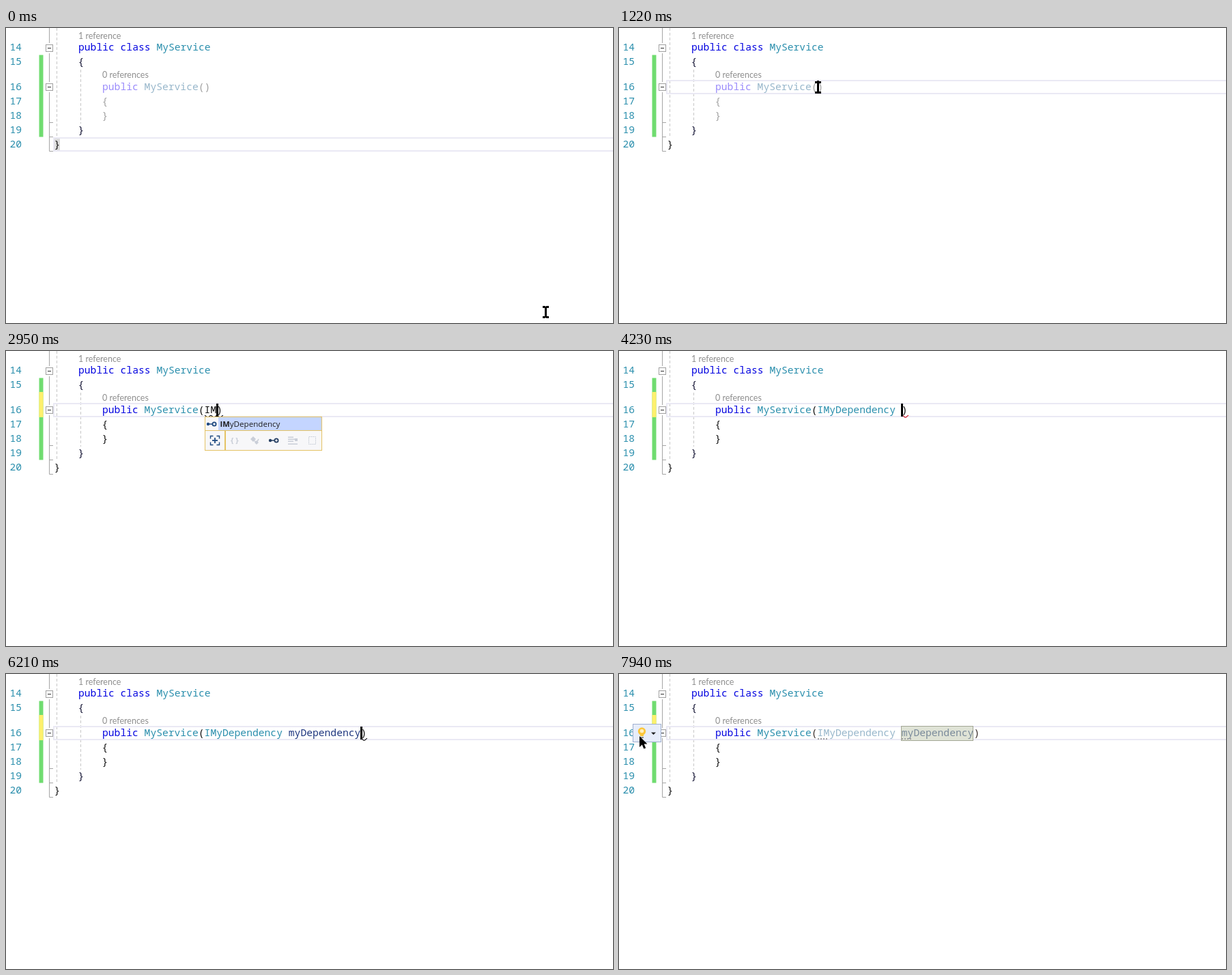
An HTML page with a canvas that plays this animation: 889x432 px, repeating every 8000 ms.

```html
<!DOCTYPE html>
<html lang="en">
<head>
<meta charset="utf-8">
<title>Constructor injection in a code editor</title>
<style>
html, body { margin: 0; width: 100%; height: 100%; overflow: hidden; background: #fff; }
canvas { display: block; width: 889px; height: 432px; }
</style>
</head>
<body>
<canvas id="stage" width="889" height="432"></canvas>
<script>
const ctx = document.getElementById('stage').getContext('2d', { alpha: false });
const LOOP = 8000, CHAR = 8.8;
const CODE = `${CHAR / 0.6}px "Noto Sans Mono", "DejaVu Sans Mono", monospace`;
const UI = '11.6px "Open Sans", "Noto Sans", sans-serif';
const UI_BOLD = 'bold 11.2px "Open Sans", "Noto Sans", sans-serif';
const LENS = '12.5px Lato, "Open Sans", sans-serif';
const BLUE = '#0404e0', TEAL = '#2b8fad', INK = '#101010', NAVY = '#1f377f';
const PALE_BLUE = '#9a8bfb', PALE_TEAL = '#98b7cb', PALE = '#a0a0a0';
const GOLD = '#e5c365', DIM = '#c9ced8', ICON = '#1f4a80', LINE = '#a5a5a5';
const ROWS = { 14: 33, 15: 54, 16: 91, 17: 112, 18: 133, 19: 154, 20: 175 };

const col = n => 141 + n * CHAR;
const within = (t, a, b) => t >= a && t < b;

function text(s, x, y, color, font = CODE) {
  ctx.font = font;
  ctx.fillStyle = color;
  ctx.fillText(s, x, y);
}
function fill(x, y, w, h, color) {
  ctx.fillStyle = color;
  ctx.fillRect(x, y, w, h);
}
function frame(x, y, w, h, color, width = 1) {
  ctx.strokeStyle = color;
  ctx.lineWidth = width;
  ctx.strokeRect(x, y, w, h);
}
function path(points, color, width = 1, dash = []) {
  ctx.strokeStyle = color;
  ctx.lineWidth = width;
  ctx.setLineDash(dash);
  ctx.beginPath();
  points.forEach(([x, y]) => ctx.lineTo(x, y));
  ctx.stroke();
  ctx.setLineDash([]);
}
function shape(points, color) {
  ctx.fillStyle = color;
  ctx.beginPath();
  points.forEach(([x, y]) => ctx.lineTo(x, y));
  ctx.fill();
}
function disc(x, y, r, color) {
  ctx.fillStyle = color;
  ctx.beginPath();
  ctx.arc(x, y, r, 0, Math.PI * 2);
  ctx.fill();
}
function squiggle(x, end, color) {
  const pts = [];
  for (let i = 0; x + i <= end; i++) pts.push([x + i, 95.8 - 1.5 * Math.cos(i * Math.PI / 4.5)]);
  path(pts, color, 1.1);
}
function dots(x) {
  for (let i = 0; i < 4; i++) fill(x + i * 4, 94, 2, 2, '#a0a0a0');
}

// Position along [time, x, y] stops.
function along(stops, t) {
  let i = 1;
  while (i < stops.length - 1 && t > stops[i][0]) i++;
  const [a, ax, ay] = stops[i - 1], [b, bx, by] = stops[i];
  const k = Math.min(1, Math.max(0, (t - a) / (b - a)));
  return [ax + (bx - ax) * k, ay + (by - ay) * k];
}
const ARRIVE = [[70, 790, 416], [200, 700, 373], [340, 567, 309], [520, 348, 150],
  [620, 315, 115], [760, 286, 89], [890, 286, 89], [1100, 291, 87]];
const LEAVE = [[6750, 797, 168], [6950, 524, 171], [7150, 275, 160], [7350, 65, 108],
  [7530, 32, 94], [7700, 30, 93], [7940, 30, 91]];

function gutter(t) {
  fill(48.5, 39.5, 6, 120, '#70dc70');
  if (t >= 2210) fill(48.5, 60, 6, 37, '#fff06c');

  path([[63.5, 0], [63.5, 180.5], [69, 180.5]], LINE);
  path([[63.5, 138.5], [69, 138.5]], LINE);
  path([[63.5, 159.5], [69, 159.5]], LINE);
  for (const y of [29, 86]) {
    fill(57, y - 7, 13, 15, '#fff');
    frame(58.5, y - 4.5, 10, 10, '#a0a0a0');
    fill(61, y, 5, 1, '#303030');
  }
  path([[74.5, 0], [74.5, 160]], '#c6c6c6', 1, [4, 3]);
  path([[109.5, 61], [109.5, 140]], '#c6c6c6', 1, [4, 3]);
  for (const n in ROWS) text(n, 5.5, ROWS[n], TEAL);
}

function caretColumn(t) {
  if (t < 2210) return 17;
  if (t < 2670) return 18;
  if (t < 3570) return 19;
  if (t < 4230) return 30;
  return t < 5940 ? 31 : 43;
}
function caretOn(t) {
  return [[1220, 1750], [2210, 3230], [3570, 4030], [4230, 4760], [5330, 5870],
    [5940, 6480], [7010, 7530]].some(([a, b]) => within(t, a, b));
}

function constructorLine(t) {
  const pale = t < 2950, final = t >= 6480;
  const punct = pale ? PALE : INK;
  if (final) {
    fill(413, 76, 106, 22, '#dfe3d6');
    frame(413.5, 76.5, 105, 21, '#a3a795');
  }
  text('public', col(0), 91, pale ? PALE_BLUE : BLUE);
  text('MyService', col(7), 91, pale ? PALE_TEAL : TEAL);
  text('(', col(16), 91, final ? '#3c302c' : punct);

  let end = 17;
  if (t >= 2210) {
    const type = t < 2670 ? 'I' : t < 3570 ? 'IM' : 'IMyDependency';
    const color = pale ? PALE : final ? PALE_TEAL : t < 3830 ? INK : TEAL;
    text(type, col(17), 91, color);
    end += type.length;
  }
  if (t >= 4230) end = 31;
  if (t >= 5940) {
    text('myDependency', col(31), 91, final ? '#7b8b9b' : NAVY);
    end = 43;
  }
  text(')', col(end), 91, final ? '#3c302c' : punct);
  text('{', 140.5, ROWS[17], punct);
  text('}', 140.5, ROWS[18], punct);

  if (within(t, 2950, 3570)) squiggle(291, 318, INK);
  if (within(t, 4230, 5940)) squiggle(415, 424, '#d01020');
  if (within(t, 5940, 6480)) squiggle(520, 529, INK);
  if (final) {
    dots(291);
    dots(414);
  }
  if (caretOn(t)) fill(Math.round(col(caretColumn(t)) - 0.4), 77, 3, 19, '#000');
}

function code(t) {
  if (t < 1220) {
    fill(70, 161, 9, 18, '#dcdcdc');
    frame(70, 161, 830, 19, '#eae9f4', 2);
  } else {
    frame(70, 77, 830, 19, '#eae9f4', 2);
  }
  text('1 reference', 106, 16, '#8e8e8e', LENS);
  text('public class', 106, 33, BLUE);
  text('MyService', 106 + 13 * CHAR, 33, TEAL);
  text('{', 105.5, ROWS[15], '#101030');
  text('0 references', 141, 73, '#8e8e8e', LENS);
  text('}', 105.5, ROWS[19], '#101030');
  text('}', 70.5, ROWS[20], INK);
  constructorLine(t);
}

function linkIcon(x, y, color) {
  disc(x - 5, y, 2.2, color);
  path([[x - 4, y], [x + 2, y]], color, 1.5);
  ctx.beginPath();
  ctx.arc(x + 4, y, 2.6, 0, Math.PI * 2);
  ctx.lineWidth = 1.8;
  ctx.stroke();
}
function toolbar(y) {
  path([[291, y + 0.5], [463, y + 0.5]], GOLD);
  path([[321, y], [321, y + 29]], GOLD, 2);
  const m = y + 15;
  for (const sx of [-1, 1]) for (const sy of [-1, 1]) {
    const x = 306 + sx * 6.5, v = m + sy * 6.5;
    path([[x - sx * 4, v], [x, v], [x, v - sy * 4]], ICON, 1.4);
  }
  path([[302, m], [310, m]], ICON, 1.8);
  path([[306, m - 4], [306, m + 4]], ICON, 1.8);
  text('{ }', 329, m + 4, DIM, UI_BOLD);
  shape([[358, m - 2], [362, m - 6], [366, m - 2], [362, m + 2]], DIM);
  path([[363, m], [367, m + 3], [370, m - 2]], DIM, 1.5);
  shape([[364, m + 3], [367, m], [370, m + 3], [367, m + 6]], DIM);
  linkIcon(392, m, '#263f63');
  [[-5, 8], [-2, 14], [1, 8], [5, 14]].forEach(([d, w]) => fill(413, m + d - 0.5, w, 1.5, DIM));
  fill(423, m - 3, 4, 4, DIM);
  ctx.setLineDash([2, 1]);
  frame(443.5, m - 5.5, 10, 11, DIM);
  ctx.setLineDash([]);
}
function panel(x, y, w, h) {
  fill(x, y, w, h, '#f7f7f9');
  frame(x + 0.5, y + 0.5, w - 1, h - 1, GOLD);
}

function typeList(t) {
  const narrow = t >= 2740;
  const items = narrow ? ['IMyDependency'] : ['IAsyncDisposable', 'IAsyncEnumerable<>',
    'IAsyncEnumerator<>', 'IAsyncResult', 'ICloneable', 'IComparable', 'IComparable<>',
    'IConvertible', 'IMyDependency'];
  const h = items.length * 19;
  panel(291, 96, 172, h + 31);
  fill(311, 97, 151, 19, '#c4d5ff');
  items.forEach((name, i) => {
    const n = narrow ? 2 : 1, y = 111 + i * 19;
    linkIcon(301, y - 4, ICON);
    text(name.slice(0, n), 313.5, y, '#1e1e1e', UI_BOLD);
    const w = ctx.measureText(name.slice(0, n)).width;
    text(name.slice(n), 313.5 + w, y, '#1e1e1e', UI);
  });
  toolbar(96 + h + 1);
  if (t >= 3300) {
    fill(465, 96, 215, 24, '#f7f7f9');
    frame(465.5, 96.5, 214, 23, '#cccedb');
    linkIcon(477, 108, ICON);
    text('interface', 488, 112, BLUE, UI);
    text('MyProject.', 541, 112, '#1e1e1e', UI);
    text('IMyDependency', 597, 112, TEAL, UI);
  }
}

function nameList(t) {
  const chosen = t >= 5120, w = chosen ? 124 : 109;
  panel(414, 96, w, 80);
  if (chosen) fill(435, 117, w - 22, 19, '#c4d5ff');
  else frame(435.5, 117.5, w - 23, 18, '#9db4ea');
  ['dependency', 'myDependency', 'my', 'value'].forEach((name, i) => {
    const y = 111 + i * 19.5;
    frame(419.5, Math.round(y) - 8.5, 9, 8, '#6b7a90');
    text(name, 437, y, '#1e1e1e', UI);
  });
  if (within(t, 4780, 5120) || within(t, 5600, 5870)) {
    const x = 414 + w + 1;
    fill(x, 118, 104, 23, '#f7f7f9');
    frame(x + 0.5, 118.5, 103, 22, '#cccedb');
    text('Suggested name', x + 7, 133, '#1e1e1e', UI);
  }
}

function bulb(t) {
  if (t >= 7450) {
    fill(20, 73, 42, 27, '#e7edfa');
    frame(20.5, 73.5, 41, 26, '#9fb0d0');
    shape([[47, 85.5], [54, 85.5], [50.5, 89]], '#1e1e1e');
  }
  disc(33.5, 84, 5.7, '#fbc63a');
  disc(33.5, 83.5, 2.8, '#fff0c0');
  fill(31, 88, 5, 3, '#fbc63a');
  fill(31, 92, 5, 2, '#8a8a80');
}

function beam(x, y) {
  x = Math.round(x);
  y = Math.round(y);
  fill(x - 1, y - 8, 3, 16, '#000');
  for (const e of [y - 9, y + 6]) {
    fill(x - 4, e, 4, 3, '#000');
    fill(x + 1, e, 4, 3, '#000');
  }
}
function arrow(x, y) {
  const pts = [[0, 0], [0, 16], [3.8, 12.6], [6.4, 18.6], [9.2, 17.4], [6.7, 11.6], [11.5, 11.4]]
    .map(([a, b]) => [x + a, y + b]);
  shape(pts, '#000');
}
function mouse(t) {
  if (t < 2210) beam(...along(ARRIVE, t));
  else if (t >= 6750) {
    const [x, y] = along(LEAVE, t);
    (x > 70 ? beam : arrow)(x, y);
  }
}

const bulbTimes = [[1750, 2210], [3370, 3570], [4030, 4230], [4850, 5870], [6480, LOOP]];

function draw(now) {
  const t = now % LOOP;
  fill(0, 0, 889, 432, '#fff');
  gutter(t);
  code(t);
  if (within(t, 2340, 3570)) typeList(t);
  if (within(t, 4300, 5940)) nameList(t);
  if (bulbTimes.some(([a, b]) => within(t, a, b))) bulb(t);
  mouse(t);
  requestAnimationFrame(draw);
}
requestAnimationFrame(draw);
</script>
</body>
</html>
```
